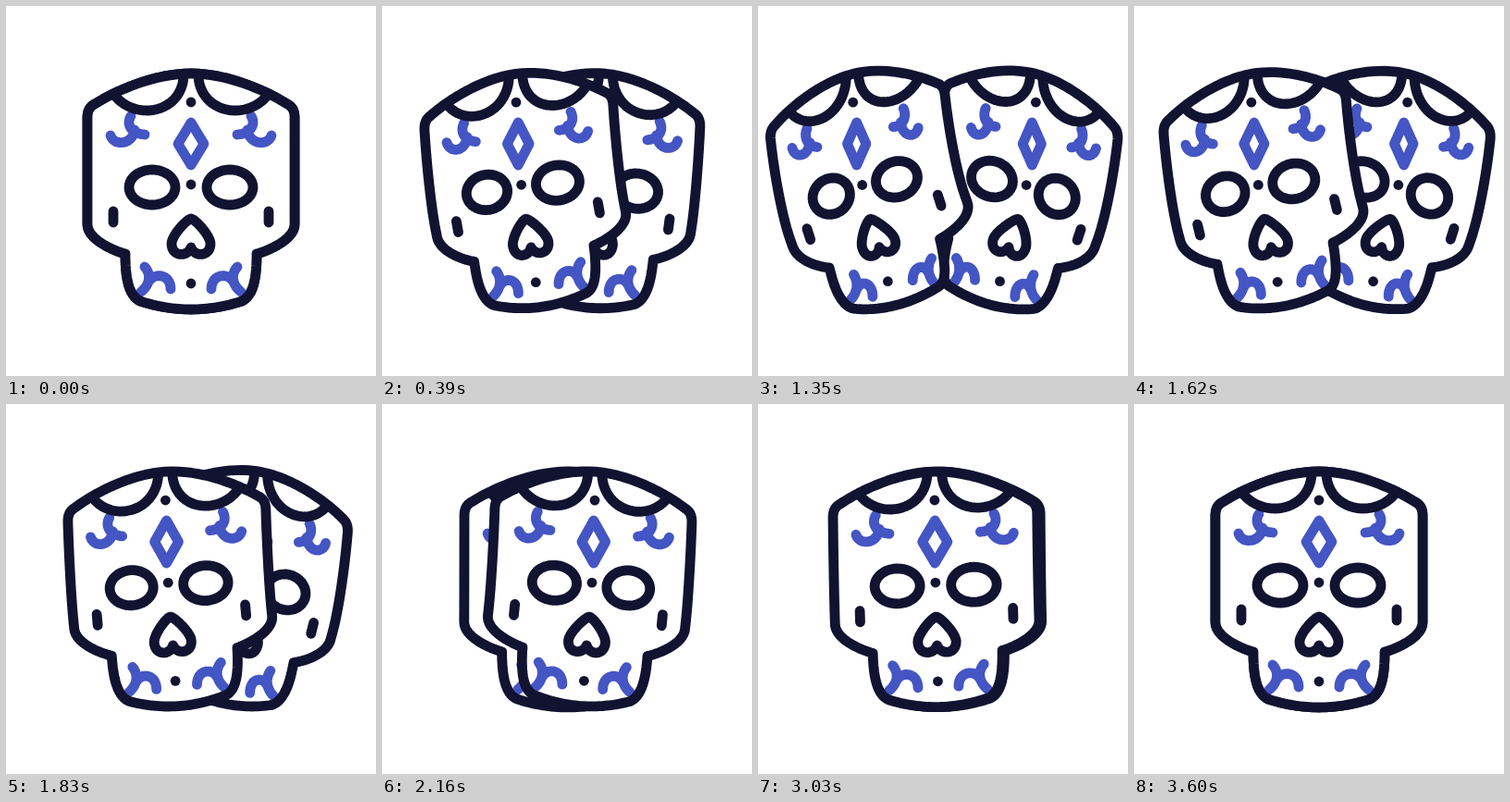
Recreate the animation shown at these times as an HTML page with a canvas. Size 400 px wide and 400 px high, loop 3630 ms.

```html
<!DOCTYPE html>
<html lang="en">
<head>
<meta charset="utf-8">
<title>Turning skulls</title>
<style>
  html, body { margin: 0; width: 100%; height: 100%; overflow: hidden; background: #fff; }
  canvas { display: block; width: 400px; height: 400px; }
</style>
</head>
<body>
<canvas id="stage" width="400" height="400"></canvas>
<script>
const ctx = document.getElementById('stage').getContext('2d');
const DARK = '#121331', BLUE = '#4455c4';
const LOOP = 3630, STEP = 30, MID = 200;

// Each swing eases to an extreme; skew < 1 starts fast, skew > 1 holds first
const swing = (end, turn, skew = 1) => ({ end, turn, skew });
const FRONT = [swing(1110, 1.06, .6), swing(2150, -.32, 1.7), swing(2960, .1), swing(3570, 0)];
const BACK = [swing(1280, 1.07, .68), swing(2370, -.31, 1.8), swing(3570, 0, .6)];

function turnAt(swings, t) {
  let begin = 0, from = 0;
  for (const { end, turn, skew } of swings) {
    if (t < end) {
      const s = ((t - begin) / (end - begin)) ** skew;
      return from + (turn - from) * (1 - Math.cos(Math.PI * s)) / 2;
    }
    begin = end;
    from = turn;
  }
  return from;
}

// Points along a chain of cubic curves that share their ends
function curve(text) {
  const n = text.split(' ').map(Number), points = [];
  for (let i = 0; i + 7 < n.length; i += 6)
    for (let k = 0; k <= 16; k++) {
      const t = k / 16, r = 1 - t;
      const at = j => r ** 3 * n[j] + 3 * r * r * t * n[j + 2] + 3 * r * t * t * n[j + 4] + t ** 3 * n[j + 6];
      points.push([at(i), at(i + 1)]);
    }
  return points;
}

const flip = points => points.map(([x, y]) => [2 * MID - x, y]);
const symmetric = half => [...half, ...flip(half).reverse()];
const ring = (n, cx, cy, rx, ry) => Array.from({ length: n }, (_, i) => {
  const a = 2 * Math.PI * i / n;
  return [cx + rx * Math.cos(a), cy + ry * Math.sin(a)];
});

const OUTLINE = symmetric(curve('200 73 160 73 118 92 96 106 90 109 88 114 88 121 88 160 88 200 88 236 ' +
  '88 252 115 264 129 268 129 292 132 313 145 319 163 325 182 328 200 328'));
const NOSE = symmetric(curve('200 230 196 230 179 248 179 257 179 271 196 272 200 261'));
const PETAL = curve('117 96 126 108 140 113 152 113 174 113 191 98 192 76');
const EYE = ring(40, 158, 196, 25, 19);
const CHEEK = [[116, 222], [116, 234]];
const DIAMOND = ring(4, MID, 149, 14, 23);
const TOP_LEAF = [curve('135 119 130 127 134 138 150 139'), curve('139 134 137 150 117 152 113 140')];
const LOW_LEAF = [curve('150 282 157 290 156 301 146 309'), curve('155 297 161 288 178 290 178 306')];

// Where a face point lands when the head is fully turned to the left
function turned(x, y) {
  const dx = x - MID, u = y - 200;
  const bend = .0005 + (y - 180) * 3e-6;
  const jaw = 3 * Math.exp(-(((y - 260) / 30) ** 2));
  return [
    117 + .18 * u + .0007 * u * u + jaw + .847 * dx + bend * dx * dx,
    y + .5 - .00015 * u * u - 1.2e-6 * u ** 3 - .21 * dx
  ];
}

const warp = p => ([x, y]) => {
  const [tx, ty] = turned(x, y);
  return [x + (tx - x) * p, y + (ty - y) * p];
};

// Slides an ornament as a whole and narrows it around its centre
const slide = (p, centre, sx, sy) => ([x, y]) =>
  [x + sx * p - (x - centre) * .26 * p, y + sy * p];

function trace(points, map, closed) {
  ctx.beginPath();
  for (const point of points) ctx.lineTo(...map(point));
  if (closed) ctx.closePath();
}

function line(points, map, color, closed = false) {
  trace(points, map, closed);
  ctx.strokeStyle = color;
  ctx.stroke();
}

function drawLeaves(leaf, centre, p, left, right) {
  for (const part of leaf) {
    line(part, slide(p, centre, ...left), BLUE);
    line(flip(part), slide(p, 2 * MID - centre, ...right), BLUE);
  }
}

function drawSkull(turn, toRight) {
  const p = Math.abs(turn), map = warp(p);
  ctx.save();
  if (toRight !== turn < 0) {
    ctx.translate(2 * MID, 0);
    ctx.scale(-1, 1);
  }
  trace(OUTLINE, map, true);
  ctx.fillStyle = '#fff';
  ctx.fill();

  drawLeaves(TOP_LEAF, 131, p, [-78, 13], [-105, -8]);
  drawLeaves(LOW_LEAF, 162, p, [-48, 8], [-57, -9]);
  line(DIAMOND, slide(p, MID, -90, 0), BLUE, true);

  for (const side of [points => points, flip]) {
    line(side(PETAL), map, DARK);
    line(side(CHEEK), map, DARK);
    line(side(EYE), map, DARK, true);
  }
  line(NOSE, map, DARK, true);
  line(OUTLINE, map, DARK, true);

  ctx.fillStyle = DARK;
  for (const y of [104, 193, 300]) {
    ctx.beginPath();
    ctx.arc(...map([MID, y]), 5.4, 0, 2 * Math.PI);
    ctx.fill();
  }
  ctx.restore();
}

function draw(now) {
  const t = Math.floor((now % LOOP) / STEP) * STEP;
  ctx.fillStyle = '#fff';
  ctx.fillRect(0, 0, 400, 400);
  ctx.lineWidth = 10.8;
  ctx.lineCap = ctx.lineJoin = 'round';
  drawSkull(turnAt(BACK, t), true);
  drawSkull(turnAt(FRONT, t), false);
}

const start = performance.now();
function tick() {
  draw(performance.now() - start);
  requestAnimationFrame(tick);
}
tick();
</script>
</body>
</html>
```
